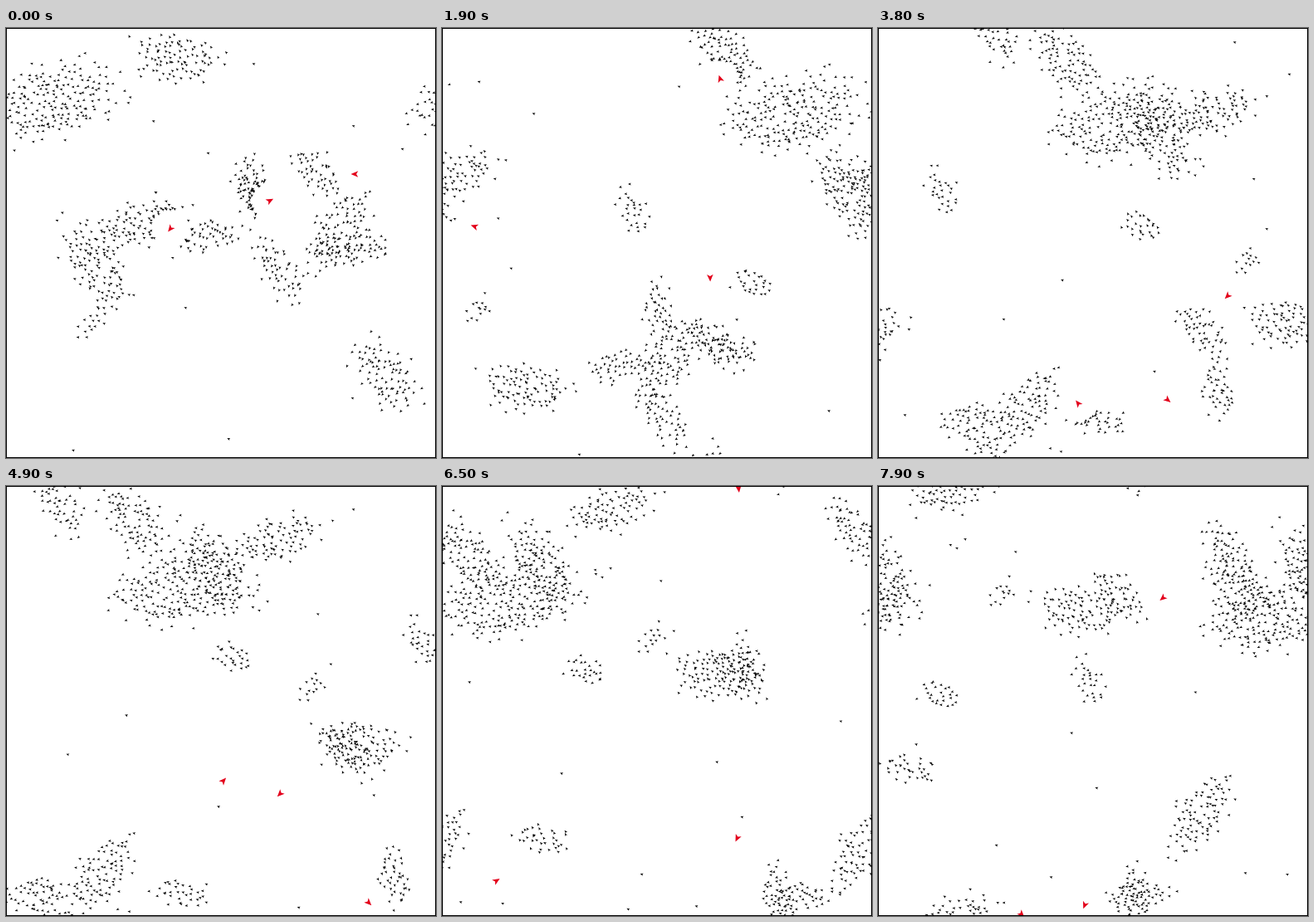
These frames come from a looping animation (518 by 518 pixels, 8000 ms). An HTML page with a canvas:

```html
<!DOCTYPE html>
<html lang="en">
<head>
<meta charset="utf-8">
<title>Flocks and hunters</title>
<style>
html, body { margin: 0; width: 100%; height: 100%; overflow: hidden; background: #fff; }
canvas { display: block; }
</style>
</head>
<body>
<canvas id="stage" width="518" height="518"></canvas>
<script>
const W = 518, LOOP = 8000, STEP = 100, SPEED = 92, FEAR = 26;
const RAD = Math.PI / 180, TURN = 2 * Math.PI;
const ctx = document.getElementById('stage').getContext('2d');

// Members, tilt, then x, y at each flock time; paths may leave the stage and wrap
const flockTimes = [0, 1.9, 4.9, 7.9];
const flocks = [
  [205, -15, 573, 88, 425, 103, 212, 122, -40, 155],
  [110, 60, 628, 287, 490, 198, 252, 100, 5, 105],
  [90, -50, 400, 245, 275, 397, 114, 468, -130, 395],
  [48, -10, 245, 250, 215, 407, 38, 490, -205, 493],
  [92, 5, 205, 554, 100, 433, -93, 311, -275, 150],
  [85, 50, 455, -100, 340, 30, 152, 42, -85, 125],
  [82, -15, 157, 235, 12, 178, -193, 64, -430, 4],
  [56, 60, 330, 293, 268, 469, 65, 540, -93, 600],
  [26, 20, 440, 262, 375, 308, 274, 207, 75, 252],
  [50, 40, 375, 176, 330, 382, 410, 320, 290, 130],
  [42, 85, 300, 190, 262, 341, 468, 472, 310, 493],
  [28, 60, 290, 195, 231, 220, -18, 188, -263, 235],
  [14, -55, 100, 358, 42, 340, -153, 245, -370, 130],
  [34, 15, 400, 270, 350, 385, 212, 490, 38, 340]
];

// x, y, heading at each hunter time
const hunterTimes = [0, 1.9, 3.8, 4.9, 5.9, 7.1, 7.9];
const hunters = [
  [[420, 176, 180], [323, 301, 88], [349, 448, 40], [437, 502, 45], [534, 504, -18], [634, 462, 14], [691, 516, 45]],
  [[318, 208, -28], [335, 61, -108], [241, -66, -128], [262, -163, -48], [352, -146, 45], [312, -58, 174], [249, -13, 112]],
  [[198, 242, 128], [39, 239, 198], [-97, 323, 135], [-188, 371, 135], [-175, 465, 62], [-152, 580, 75], [-175, 653, 140]]
].map(path => path.map(([x, y, deg]) =>
  ({ x, y, vx: SPEED * Math.cos(deg * RAD), vy: SPEED * Math.sin(deg * RAD) })));

let seed = 20517;
function rand() {
  seed = (seed * 1664525 + 1013904223) >>> 0;
  return seed / 4294967296;
}
const near = d => d - W * Math.round(d / W);
const wrap = v => ((v % W) + W) % W;

// Evenly spread members: keep the loneliest of a few random candidates
function fill(n, deg) {
  const c = Math.cos(deg * RAD), s = Math.sin(deg * RAD);
  const a = 4.6 * Math.sqrt(n), b = a / 2, members = [];
  while (members.length < n) {
    let best = null, gap = -1;
    for (let k = 0; k < 5; k++) {
      const r = Math.sqrt(rand()) * (1 + 0.7 * rand() ** 6), q = rand() * TURN;
      const u = a * r * Math.cos(q), v = b * r * Math.sin(q);
      const p = { x: u * c - v * s, y: u * s + v * c };
      const g = Math.min(...members.map(o => Math.hypot(o.x - p.x, o.y - p.y)));
      if (g > gap) { gap = g; best = p; }
    }
    best.phase = rand() * TURN;
    members.push(best);
  }
  return members;
}

// Smooth path: the velocity at each key follows from its neighbours
function route(coords) {
  const last = flockTimes.length - 1;
  return flockTimes.map((_, k) => {
    const a = Math.max(0, k - 1), b = Math.min(last, k + 1), dt = flockTimes[b] - flockTimes[a];
    return {
      x: coords[2 * k], y: coords[2 * k + 1],
      vx: (coords[2 * b] - coords[2 * a]) / dt,
      vy: (coords[2 * b + 1] - coords[2 * a + 1]) / dt
    };
  });
}

const swarm = flocks.map(([n, deg, ...coords]) => ({ path: route(coords), members: fill(n, deg) }));
const strays = Array.from({ length: 16 }, () => ({ x: rand() * W, y: rand() * W }));

// Hermite curve through the keys: place and heading at time t
function at(path, times, t) {
  let k = 0;
  while (k < times.length - 2 && t >= times[k + 1]) k++;
  const p = path[k], q = path[k + 1], h = times[k + 1] - times[k];
  const u = (t - times[k]) / h, u2 = u * u, u3 = u2 * u;
  const pos = (a, va, b, vb) => (2 * u3 - 3 * u2 + 1) * a + (u3 - 2 * u2 + u) * h * va
    + (3 * u2 - 2 * u3) * b + (u3 - u2) * h * vb;
  const vel = (a, va, b, vb) => (6 * u2 - 6 * u) / h * (a - b)
    + (3 * u2 - 4 * u + 1) * va + (3 * u2 - 2 * u) * vb;
  return {
    x: pos(p.x, p.vx, q.x, q.vx),
    y: pos(p.y, p.vy, q.y, q.vy),
    angle: Math.atan2(vel(p.y, p.vy, q.y, q.vy), vel(p.x, p.vx, q.x, q.vx))
  };
}

function flee(x, y, threats) {
  for (const h of threats) {
    const dx = near(x - h.x), dy = near(y - h.y), d = Math.hypot(dx, dy) || 1;
    if (d < FEAR) {
      const push = (FEAR - d) * 0.8 / d;
      x += dx * push;
      y += dy * push;
    }
  }
  return [x, y];
}

function dart(x, y, angle, tip, tail, half, notch) {
  const c = Math.cos(angle), s = Math.sin(angle);
  const px = wrap(x), py = wrap(y);
  const pt = (u, v) => [px + u * c - v * s, py + u * s + v * c];
  ctx.moveTo(...pt(tip, 0));
  ctx.lineTo(...pt(-tail, half));
  ctx.lineTo(...pt(-notch, 0));
  ctx.lineTo(...pt(-tail, -half));
  ctx.closePath();
}

function bird(x, y, angle, threats) {
  dart(...flee(x, y, threats), angle, 2, 1.7, 1.5, 0.9);
}

function draw(now) {
  const t = Math.floor((now % LOOP) / STEP) * STEP / 1000;
  const threats = hunters.map(path => at(path, hunterTimes, t));
  ctx.fillStyle = '#fff';
  ctx.fillRect(0, 0, W, W);

  ctx.beginPath();
  for (const { path, members } of swarm) {
    const lead = at(path, flockTimes, t);
    for (const m of members) {
      const sway = Math.sin(t + m.phase);
      bird(lead.x + m.x + 2 * sway, lead.y + m.y - 2 * sway, lead.angle + 0.3 * sway, threats);
    }
  }
  for (const s of strays) bird(s.x - 70 * t, s.y - 25 * t, Math.PI + 0.34, threats);
  ctx.fillStyle = '#000';
  ctx.fill();

  ctx.beginPath();
  for (const h of threats) dart(h.x, h.y, h.angle, 4.6, 4.2, 3.8, 2);
  ctx.fillStyle = '#e3001b';
  ctx.fill();

  ctx.strokeStyle = '#000';
  ctx.lineWidth = 1;
  ctx.strokeRect(0.5, 0.5, W - 1, W - 1);
}

const start = performance.now();
function tick() {
  draw(performance.now() - start);
  requestAnimationFrame(tick);
}
tick();
</script>
</body>
</html>
```
